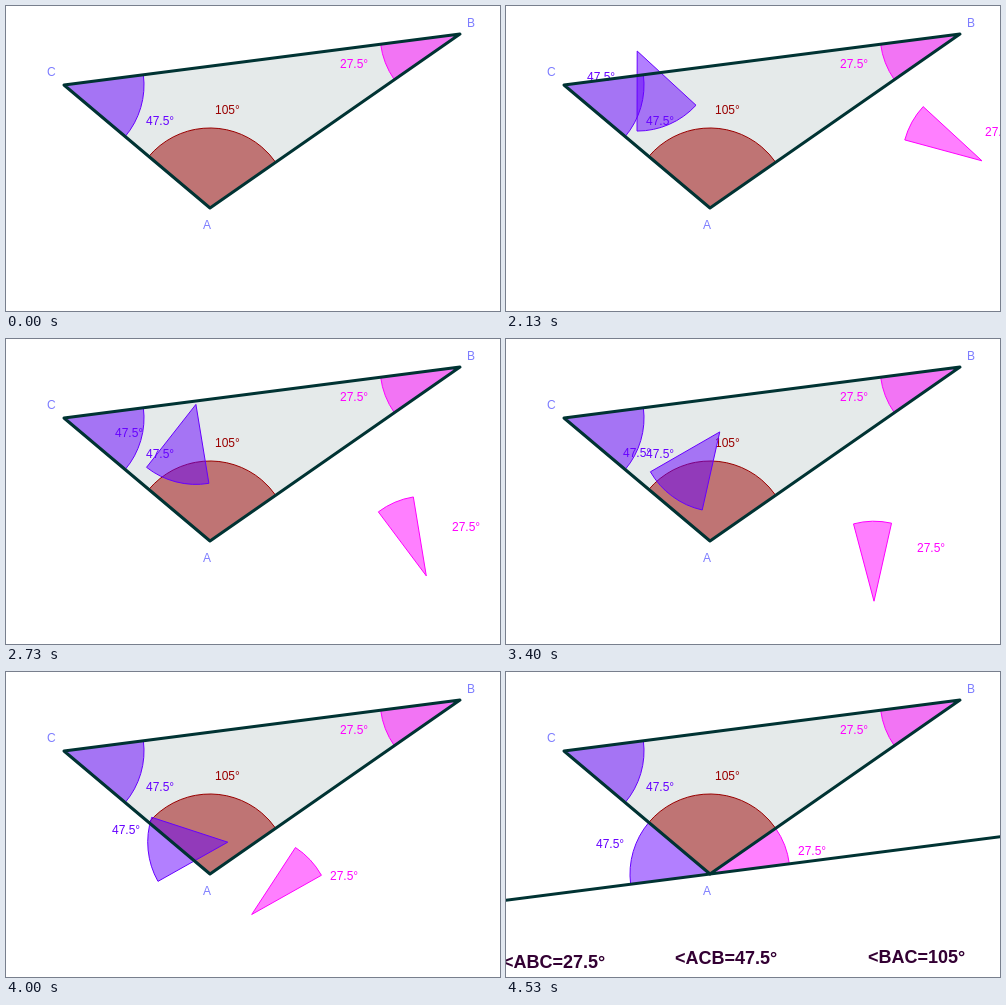
Write an HTML page with a canvas that moves like this. It is 494 px wide and 305 px high and loops after 7.14 s.

```html
<!DOCTYPE html>
<html lang="en">
<head>
<meta charset="utf-8">
<title>Angle sum of a triangle</title>
<style>
  html, body { margin: 0; width: 100%; height: 100%; overflow: hidden; background: #fff; }
  canvas { display: block; }
</style>
</head>
<body>
<canvas id="stage" width="494" height="305"></canvas>
<script>
const ctx = document.getElementById('stage').getContext('2d');
const LOOP = 7140, RESULT_AT = 4530, RADIUS = 80;
const A = [204, 202], B = [454, 28], C = [58, 79];
const INK = '#003333', VERTEX = '#7d7dff';
const PURPLE = '102,0,255', PINK = '255,0,255', RED = '153,0,0';

// [start ms, slider angle in degrees]; the slider jumps between values
const STEPS = [
  [1470, 10], [1800, 33], [2130, 50], [2400, 55], [2470, 60], [2730, 88],
  [3070, 105], [3400, 110], [3600, 120], [3670, 128], [3870, 140],
  [3930, 150], [4000, 158], [4130, 165], [4330, 174], [4470, 180]
];

const heading = (p, q) => Math.atan2(q[1] - p[1], q[0] - p[0]);
const midpoint = (p, q) => [(p[0] + q[0]) / 2, (p[1] + q[1]) / 2];

function rotate([x, y], [cx, cy], turn) {
  const c = Math.cos(turn), s = Math.sin(turn), dx = x - cx, dy = y - cy;
  return [cx + dx * c - dy * s, cy + dx * s + dy * c];
}

function text(str, x, y, color, font = '12px') {
  ctx.font = `${font} "Liberation Sans", Arial, sans-serif`;
  ctx.fillStyle = color;
  ctx.fillText(str, x, y);
}

function sector([x, y], from, to, rgb) {
  ctx.beginPath();
  ctx.moveTo(x, y);
  ctx.arc(x, y, RADIUS, from, to);
  ctx.closePath();
  ctx.fillStyle = `rgba(${rgb},.5)`;
  ctx.fill();
  ctx.lineWidth = 1;
  ctx.strokeStyle = `rgb(${rgb})`;
  ctx.stroke();
}

function trace(...points) {
  ctx.beginPath();
  points.forEach(p => ctx.lineTo(...p));
}

function inkStroke() {
  ctx.lineWidth = 3;
  ctx.lineJoin = 'round';
  ctx.strokeStyle = INK;
  ctx.stroke();
}

const angles = {
  c: { apex: C, from: heading(C, B), to: heading(C, A), rgb: PURPLE,
       label: '47.5°', offset: [-69, -13] },
  b: { apex: B, from: heading(B, A), to: heading(B, C) + 2 * Math.PI, rgb: PINK,
       label: '27.5°', offset: [44, -2] }
};
angles.b.to = angles.b.from + (angles.b.to - angles.b.from) % (2 * Math.PI);

// Copy of an angle turned about the midpoint of the side that ends in A
function turnedAngle({ apex, from, to, rgb, label, offset }, turn) {
  const p = rotate(apex, midpoint(apex, A), turn);
  sector(p, from + turn, to + turn, rgb);
  const mid = (from + to) / 2 + turn, reach = RADIUS / 1.7;
  text(label,
    Math.round(p[0] + reach * Math.cos(mid) + offset[0]),
    Math.round(p[1] + reach * Math.sin(mid) + offset[1]), `rgb(${rgb})`);
}

function draw(t) {
  ctx.fillStyle = '#fff';
  ctx.fillRect(0, 0, 494, 305);

  trace(A, B, C);
  ctx.fillStyle = 'rgba(0,51,51,.1)';
  ctx.fill();

  sector(A, heading(A, C), heading(A, B), RED);
  for (const { apex, from, to, rgb } of Object.values(angles)) sector(apex, from, to, rgb);
  text('47.5°', 140, 119, `rgb(${PURPLE})`);
  text('27.5°', 334, 62, `rgb(${PINK})`);
  text('105°', 209, 108, `rgb(${RED})`);

  const step = STEPS.filter(([start]) => start <= t).pop();
  if (step) {
    const turn = step[1] * Math.PI / 180;
    turnedAngle(angles.c, turn);
    turnedAngle(angles.b, turn);
  }

  trace(A, B, C);
  ctx.closePath();
  inkStroke();

  if (t >= RESULT_AT) {
    const slope = (B[1] - C[1]) / (B[0] - C[0]);
    const lineY = x => A[1] + slope * (x - A[0]);
    trace([-5, lineY(-5)], [499, lineY(499)]);
    inkStroke();
    text('<ABC=27.5°', -3, 296, '#330033', 'bold 18px');
    text('<ACB=47.5°', 169, 292, '#330033', 'bold 18px');
    text('<BAC=105°', 362, 291, '#330033', 'bold 18px');
  }

  text('A', 197, 223, VERTEX);
  text('B', 461, 21, VERTEX);
  text('C', 41, 70, VERTEX);
}

const begin = performance.now();
function tick() {
  draw((performance.now() - begin) % LOOP);
  requestAnimationFrame(tick);
}
tick();
</script>
</body>
</html>
```
